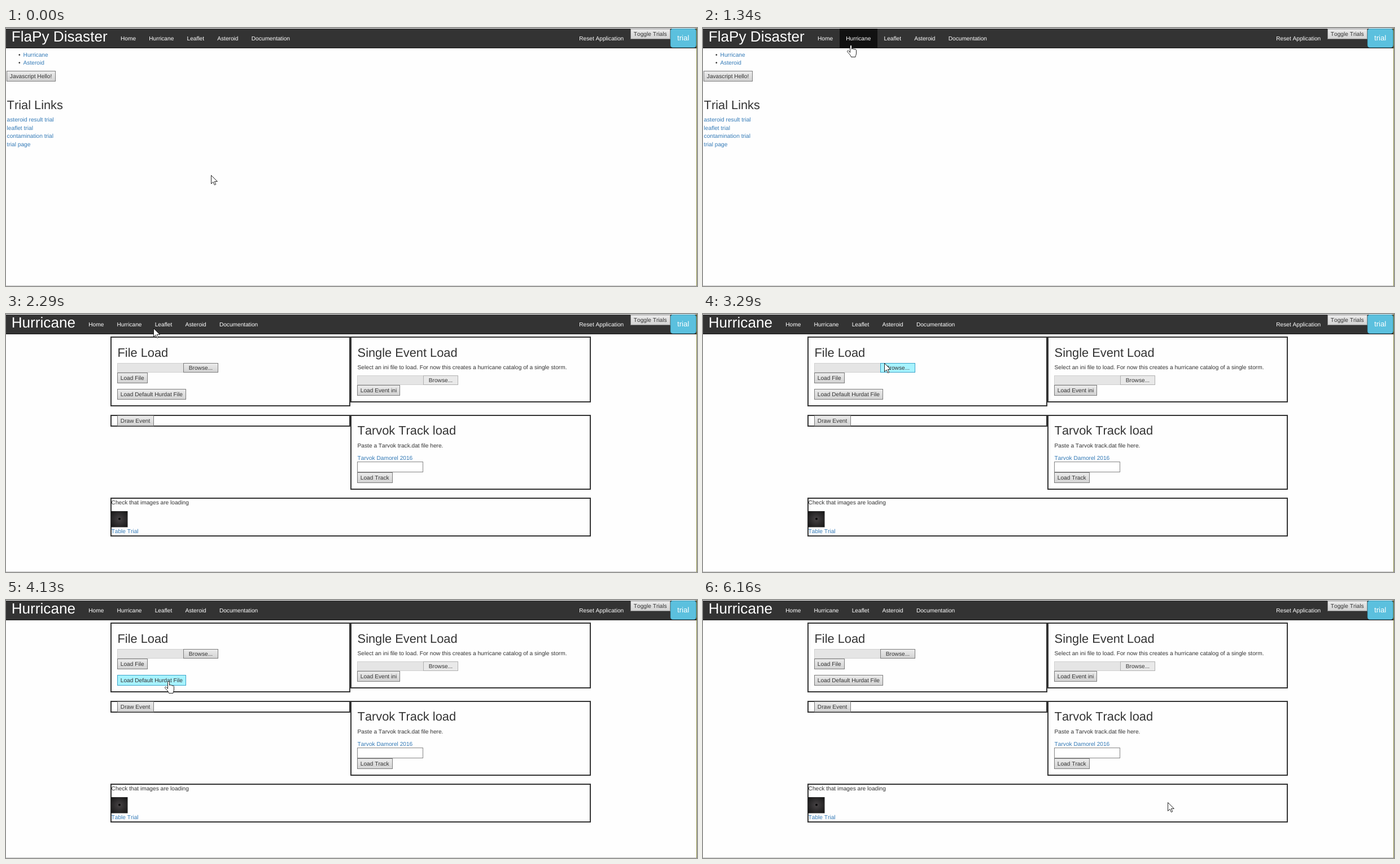
An HTML page for the animation above (7.09 s loop, 1224x458 px).

```html
<!DOCTYPE html>
<html lang="en">
<head>
<meta charset="utf-8">
<title>FlaPy Disaster</title>
<style>
  html, body { margin: 0; width: 100%; height: 100%; overflow: hidden; background: #fefefe; }
  svg { display: block; width: 1224px; height: 458px; }
  text { font: 10.16px "Liberation Sans", Arial, sans-serif; font-kerning: none; fill: #333; text-rendering: geometricPrecision; }
  .nav { fill: #fff; }
  .title { font-size: 26.15px; fill: #fff; }
  .head { font-size: 21.8px; }
  .user { font-size: 13.05px; fill: #fff; }
  .link { fill: #337ab7; }
  .panel { fill: none; stroke: #333; stroke-width: 2; }
  .field { fill: #e5e5e5; stroke: #cfcfcf; }
  .input { fill: #fff; stroke: #858585; }
  .button rect { fill: url(#face); stroke: #7c7c7c; }
  .pale rect { stroke: #b0b0b0; fill: #e9e9e9; }
  .hover rect { fill: #a7f3ff; stroke: #3ba3c8; }
  .pressed rect { fill: #7adcf0; stroke: #2a86ab; }
  #cursor path { fill: #fff; stroke: #000; stroke-width: .85; }
</style>
</head>
<body>
<svg id="stage" viewBox="0 0 1224 458"></svg>
<script>
const LOOP = 7090, PAGE_TURN = 2290, STEP = 77;

const pen = document.createElement('canvas').getContext('2d');
pen.font = '10.16px "Liberation Sans", Arial, sans-serif';
pen.fontKerning = 'none';

const rect = (x, y, w, h, attrs) =>
  `<rect x="${x}" y="${y}" width="${w}" height="${h}" ${attrs}/>`;
// A one-pixel or two-pixel border drawn inside the given box.
const box = (cls, x, y, w, h, line = 1) =>
  rect(x + line / 2, y + line / 2, w - line, h - line, `class="${cls}"`);
const panel = (x, y, w, h) => box('panel', x, y, w, h, 2);
const text = (x, y, s, cls = '') => `<text x="${x}" y="${y}" class="${cls}">${s}</text>`;
const list = (x, y, items, cls) => items.map((s, i) => text(x, y + i * 14.45, s, cls)).join('');

function button(x, y, s, { id = '', cls = '', pad = 5.8, h = 19 } = {}) {
  const w = Math.ceil(pen.measureText(s).width + 2 * pad);
  return `<g class="button ${cls}" id="${id}">${box('', x, y, w, h)}${text(x + pad, y + h / 2 + 3.8, s)}</g>`;
}
const picker = (x, y, opts) => box('field', x, y, 118, 17) +
  button(x + 117, y, 'Browse...', { pad: 9.8, h: 17, ...opts });

const MENU = ['Home', 'Hurricane', 'Leaflet', 'Asteroid', 'Documentation'];
const nav = (title, x) => text(9.7, 24.3, title, 'title') +
  text(x, 22.2, MENU.map((s, i) => `<tspan dx="${i && 23.2}">${s}</tspan>`).join(''), 'nav');

const homePage = nav('FlaPy Disaster', 203) +
  list(22, 50.5, ['•', '•']) +
  list(30.6, 50.5, ['Hurricane', 'Asteroid'], 'link') +
  button(1, 76, 'Javascript Hello!') +
  text(1.6, 143.5, 'Trial Links', 'head') +
  list(1.6, 166.3, ['asteroid result trial', 'leaflet trial', 'contamination trial', 'trial page'], 'link');

const LEFT = 197, RIGHT = 622, HALF = 425;
const stormPage = nav('Hurricane', 146.2) +
  panel(185, 40, HALF, 124) + panel(610, 40, HALF + 1, 117) +
  panel(185, 179, HALF, 21) + panel(610, 179, HALF + 1, 133) +
  panel(185, 326, 2 * HALF + 1, 69) +
  text(LEFT + .5, 75.5, 'File Load', 'head') +
  picker(LEFT, 87, { id: 'browse' }) +
  button(LEFT, 104, 'Load File') +
  button(LEFT, 133, 'Load Default Hurdat File', { id: 'hurdat' }) +
  button(LEFT, 180, 'Draw Event') +
  text(RIGHT + .6, 75.5, 'Single Event Load', 'head') +
  text(RIGHT + .6, 97.6, 'Select an ini file to load. For now this creates a hurricane catalog of a single storm.') +
  picker(RIGHT, 109, { cls: 'pale' }) +
  button(RIGHT, 126, 'Load Event ini') +
  text(RIGHT + .6, 214.2, 'Tarvok Track load', 'head') +
  text(RIGHT + .6, 236.5, 'Paste a Tarvok track.dat file here.') +
  text(RIGHT + .6, 258.6, 'Tarvok Damorel 2016', 'link') +
  box('input', RIGHT, 262, 117, 19) +
  button(RIGHT, 281, 'Load Track') +
  text(186.6, 338.2, 'Check that images are loading') +
  rect(186, 350, 29.5, 28.5, 'fill="url(#eye)"') +
  '<circle cx="201" cy="363.7" r="1.9"/>' +
  text(186.6, 389.4, 'Table Trial', 'link');

document.getElementById('stage').innerHTML = `
  <defs>
    <linearGradient id="face" x2="0" y2="1"><stop stop-color="#ececec"/><stop offset="1" stop-color="#d2d2d2"/></linearGradient>
    <radialGradient id="eye" r=".7"><stop stop-color="#484446"/><stop offset="1" stop-color="#141414"/></radialGradient>
  </defs>
  ${rect(0, 0, 1224, 458, 'fill="#fefefe"')}
  ${rect(0, 1, 1223, 35, 'fill="#333"')}
  ${rect(0, 35, 1223, 1, 'fill="#111"')}
  ${rect(242, 1, 67, 35, 'fill="#111" id="tab"')}
  <g id="home">${homePage}</g>
  <g id="storm">${stormPage}</g>
  ${text(1015.2, 22.2, 'Reset Application', 'nav')}
  ${button(1106, 1, 'Toggle Trials')}
  ${rect(1177.3, 1.4, 45, 33, 'rx="4" fill="#5bc0de" stroke="#46b8da" stroke-width=".7"')}
  ${text(1189.1, 22.4, 'trial', 'user')}
  ${rect(0, 457, 1224, 1, 'fill="#c6c6c6"')}
  ${rect(1223, 0, 1, 458, 'fill="#7f8238"')}
  <g id="cursor">
    <path id="arrow" d="M.5 .5V15.5L4 12.2 6.4 17.6 8.7 16.6 6.4 11.4H11.4Z"/>
    <path id="hand" transform="translate(-6)" d="M5.5 13.5V2.2c0-2.2 3-2.2 3 0V7.5c0-1.4 2.8-1.4 2.8.5 0-1.3 2.6-1.3 2.6.6 0-1.1 2.6-1.1 2.6.8V15c0 3-1.5 4-1.5 6.5H7.5C7 18.5 3 15 .8 12.3c-1-1.6 1-3 2.6-1.4z"/>
    <circle id="ring" r="6.8" fill="none" stroke="#2b9fd9" stroke-width="3"/>
  </g>`;

// Each leg takes the pointer to a place in a number of equal time steps;
// the ease powers let x and y slow down differently, which bends the path.
const START = [363, 261];
const LEGS = [
  { at: 110, steps: 2, to: [362, 262] },
  { at: 400, steps: 1, to: [362, 264] },
  { at: 630, steps: 9, to: [262, 35], ease: [3.6, 2.28] },
  { at: 1340, steps: 2, to: [260, 25] },
  { at: 2110, steps: 1, to: [261, 25] },
  { at: 2740, steps: 8, to: [321, 87] },
  { at: 3360, steps: 6, to: [287, 144], ease: [1.4, 1.4] },
  { at: 4840, steps: 4, to: [827, 361], ease: [2, 2] },
  { at: 5770, steps: 2, to: [823, 360] },
  { at: 6160, steps: 1, to: [823, 359] }
];

function pointerAt(t) {
  let pos = START;
  for (const { at, steps, to, ease = [1, 1] } of LEGS) {
    if (t < at) break;
    const p = Math.min(1, (Math.floor((t - at) / STEP) + 1) / steps);
    pos = pos.map((a, i) => Math.round(a + (to[i] - a) * (1 - (1 - p) ** ease[i])));
  }
  return pos;
}

const el = Object.fromEntries([...document.querySelectorAll('[id]')].map(e => [e.id, e]));
const show = (e, on) => e.style.display = on ? '' : 'none';

function draw(t) {
  const [x, y] = pointerAt(t);
  const over = (left, top, w, h) => x >= left && x < left + w && y >= top && y < top + h;
  const onStorm = t >= PAGE_TURN;
  const onTab = !onStorm && over(242, 1, 67, 35);
  const onHurdat = onStorm && over(LEFT, 133, 122, 19);
  const waiting = t >= 1800 && t < PAGE_TURN;
  const shape = !waiting ? (onTab || onHurdat ? 'hand' : 'arrow')
    : t < 1950 ? 'none' : t < 2110 ? 'ring' : 'arrow';

  show(el.home, !onStorm);
  show(el.storm, onStorm);
  show(el.tab, onTab);
  el.browse.classList.toggle('hover', over(314, 87, 63, 17));
  el.hurdat.classList.toggle('hover', onHurdat);
  el.hurdat.classList.toggle('pressed', t >= 3980 && t < 4130);
  for (const id of ['arrow', 'hand', 'ring']) show(el[id], id === shape);
  el.cursor.setAttribute('transform', `translate(${x} ${y})`);
}

const start = performance.now();
function tick() {
  draw((performance.now() - start) % LOOP);
  requestAnimationFrame(tick);
}
tick();
</script>
</body>
</html>
```
